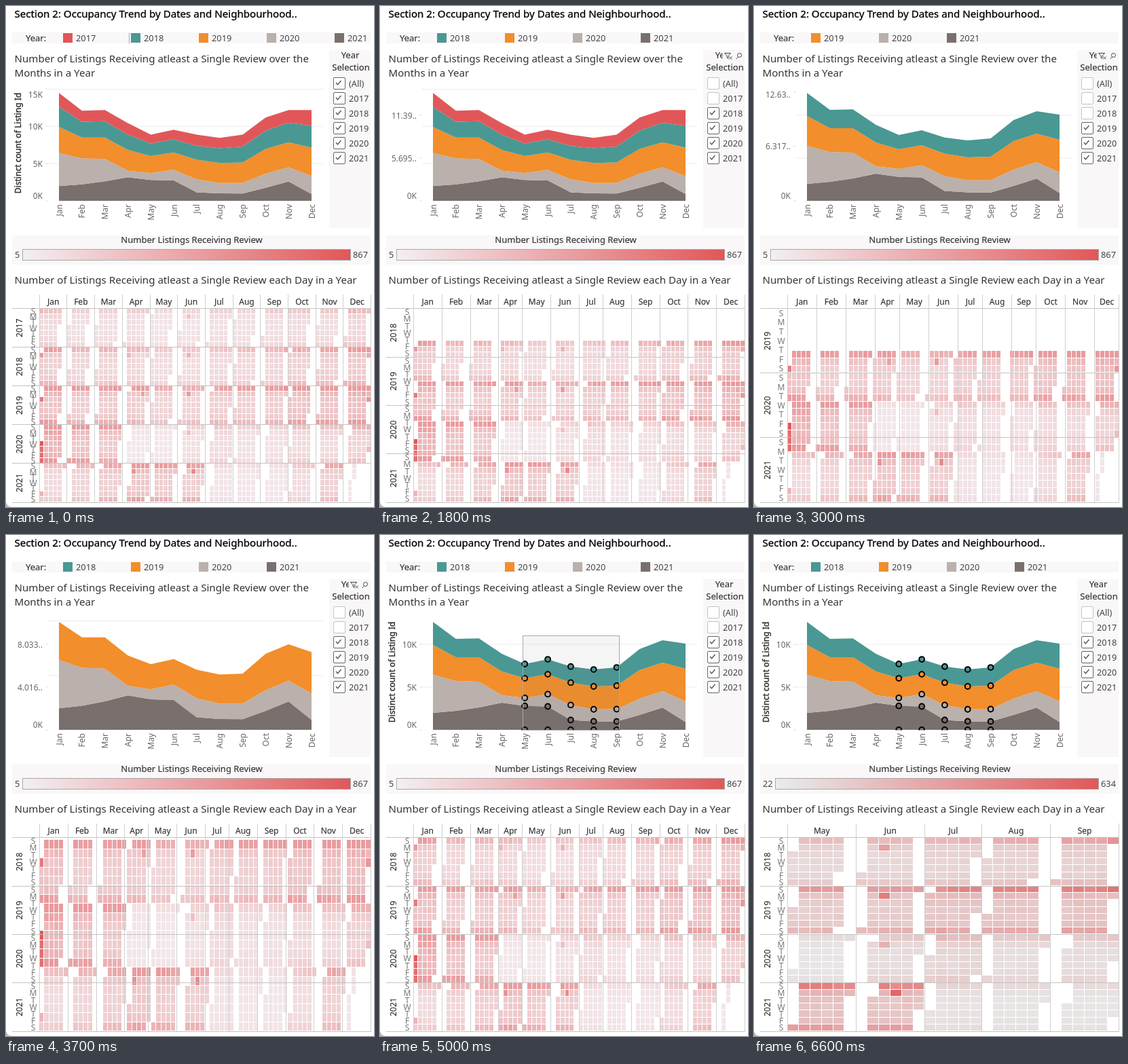
Write an HTML page with a canvas that moves like this. It is 542 px wide and 738 px high and loops after 7 s.

```html
<!DOCTYPE html>
<html lang="en">
<head>
<meta charset="utf-8">
<title>Occupancy Trend</title>
<style>
  html, body { margin: 0; width: 100%; height: 100%; overflow: hidden; background: #fff; }
  canvas, svg { position: absolute; left: 0; top: 0; }
  text { font-family: "Noto Sans", "Open Sans", sans-serif; font-size: 12px; fill: #333; }
  .head { font-size: 15.1px; }
  .title { font-size: 15.1px; fill: #000; stroke: #000; stroke-width: .3px; }
  .cap { font-size: 13px; stroke: #333; stroke-width: .15px; }
  .item { font-size: 12.8px; fill: #444; }
  .soft { fill: #666; }
  .axis { font-size: 12.1px; stroke: #333; stroke-width: .45px; }
  .month { stroke: #333; stroke-width: .15px; }
  .day { fill: #777; }
  .panel { fill: #f9f7f8; }
</style>
</head>
<body>
<canvas id="cells" width="542" height="738"></canvas>
<svg width="542" height="738" viewBox="0 0 542 738">
  <defs>
    <linearGradient id="ramp"><stop id="low"/><stop offset="1" stop-color="#e15759"/></linearGradient>
    <clipPath id="plot"><rect x="62" y="110" width="406" height="177.5"/></clipPath>
  </defs>
  <rect class="panel" x="9" y="39" width="528" height="16"/>
  <rect class="panel" x="476" y="65" width="61" height="262"/>
  <rect class="panel" x="9" y="338" width="528" height="43"/>
  <path d="M0 730Q1 737 8 738H0Z" fill="#bbb"/>
  <text class="title" x="12.5" y="16.5">Section 2: Occupancy Trend by Dates and Neighbourhood..</text>
  <text class="cap" x="29" y="52">Year:</text>
  <text class="head" x="12.5" y="83">Number of Listings Receiving atleast a Single Review over the</text>
  <text class="head" x="12.5" y="104">Months in a Year</text>
  <text class="cap" x="507" y="77" text-anchor="middle">Year</text>
  <text class="cap" x="508" y="95" text-anchor="middle">Selection</text>
  <text class="cap" x="273.5" y="349" text-anchor="middle">Number Listings Receiving Review</text>
  <text class="head" x="12.5" y="409">Number of Listings Receiving atleast a Single Review each Day in a Year</text>
  <g id="live"></g>
</svg>
<script>
const LOOP = 7000, STEP = 100;
const MONTHS = 'Jan Feb Mar Apr May Jun Jul Aug Sep Oct Nov Dec'.split(' ');
const COLORS = { 2017: '#e15759', 2018: '#499894', 2019: '#f28e2b', 2020: '#bab0ac', 2021: '#79706e' };
// Listings per month, in thousands
const COUNTS = {
  2017: [1.88, 1.47, 1.5, 1.56, 1.2, 1.3, 1.5, 1.39, 1.6, 1.76, 1.72, 2.12],
  2018: [2.7, 2.13, 2.2, 2.06, 1.67, 1.75, 1.88, 1.98, 2.14, 2.46, 2.62, 2.94],
  2019: [3.49, 2.79, 2.87, 2.78, 2.3, 2.33, 2.62, 2.68, 2.74, 3.33, 3.34, 3.81],
  2020: [4.45, 3.49, 3.01, .88, .93, 1.43, 1.75, 1.4, 1.44, 1.9, 1.92, 2.41],
  2021: [1.98, 2.22, 2.62, 3.17, 2.8, 2.74, 1.15, 1, .98, 1.75, 2.6, .92]
};
const WEEKDAY = [0, 1.15, .95, .9, .9, 1];
const EASTER = { 2018: 2, 2019: 22, 2021: 5 };
const LEFT = 49.3, RIGHT = 537.6, TOP = 445.7, BOTTOM = 731, BASE = 287, PLOT_H = 159;

const range = (a, b) => Array.from({ length: b - a + 1 }, (_, i) => a + i);
const lerp = (a, b, p) => a + (b - a) * p;
const clamp = (v, a, b) => Math.min(b, Math.max(a, v));
const ease = u => u * u * (3 - 2 * u);
const monthX = m => 78 + m * 33.82;

// How busy a day is, 0 to 1
function busyness(y, m, d, dow) {
  const n = COUNTS[y][m], base = .068 * n ** 1.2;
  const wave = Math.sin(y * 78.233 + (m * 31 + d) * 12.9898) * 43758.5453;
  const jitter = .9 + .2 * (wave - Math.floor(wave));
  if (m === 0 && d === 1) return Math.min(1, base * 2.5);
  if (m === 0 && d <= 4 && n > 4) return .85;
  if (m === 11 && d === 31) return base * 1.7;
  if (m === 5 && dow === 1 && d > 7 && d < 15) return base * 2.9;
  if (m === 3 && d === EASTER[y]) return base * 2.2;
  if (m === 8 && dow === 0 && d > 28) return base * 2.6;
  const factor = dow === 0 ? Math.min(2.3, 1.3 + .35 * n)
    : dow === 6 ? Math.min(1.7, .9 + .25 * n) : WEEKDAY[dow];
  return Math.min(.55, base * factor * jitter);
}

const days = [];
for (const y of range(2017, 2021)) {
  const first = new Date(y, 0, 1).getDay();
  let doy = 0;
  for (const m of range(0, 11)) {
    const count = new Date(y, m + 1, 0).getDate();
    for (let d = 1; d <= count; d++, doy++) {
      if (y === 2021 && m === 11 && d > 7) break;
      const dow = (first + doy) % 7;
      days.push({ y, m, dow, week: Math.floor((first + doy) / 7), value: 5 + 862 * busyness(y, m, d, dow) });
    }
  }
}

// Each month gets one slot per week that any shown year uses
function view(firstYear, months = range(0, 11), scale = { min: 5, max: 867, low: [243, 239, 242], x: 24 }) {
  const years = range(firstYear, 2021), cols = {};
  let slots = 0;
  for (const m of months) {
    const weeks = days.filter(c => c.m === m && years.includes(c.y)).map(c => c.week);
    const first = Math.min(...weeks), n = Math.max(...weeks) - first + 1;
    cols[m] = { first, n, start: slots };
    slots += n;
  }
  const top = Math.max(...range(0, 11).map(m => years.reduce((s, y) => s + COUNTS[y][m], 0)));
  return { years, months, cols, scale, top, slot: (RIGHT - LEFT) / slots, row: (BOTTOM - TOP) / years.length };
}
const colX = (v, m) => LEFT + v.cols[m].start * v.slot;
const shows = (v, c) => v.years.includes(c.y) && v.months.includes(c.m);
function place(v, c) {
  const h = v.row / 7;
  return [colX(v, c.m) + (c.week - v.cols[c.m].first) * v.slot,
    TOP + v.years.indexOf(c.y) * v.row + c.dow * h, v.slot, h];
}

// "axis" and "cells" are how far those parts have moved in the first step
const four = view(2018);
const phases = [
  { at: 0, view: view(2017), steps: 1 },
  { at: 1800, view: four, steps: 5, axis: .0663, cells: .165 },
  { at: 3000, view: view(2019), steps: 3, axis: .0319, cells: .12 },
  { at: 3700, view: four, steps: 6, axis: .08085, cells: .05 },
  { at: 5700, view: view(2018, range(4, 8), { min: 22, max: 634, low: [232, 237, 237], x: 31 }),
    steps: 5, axis: 0, cells: 0, lateFrom: 6 }
];

const ctx = document.getElementById('cells').getContext('2d');
const live = document.getElementById('live'), low = document.getElementById('low');

function drawCells(from, to, p, lateFrom = 12) {
  ctx.clearRect(0, 0, 542, 738);
  const { min, max, low } = to.scale, high = [225, 87, 89];
  for (const c of days) {
    if (!shows(to, c)) continue;
    let box = place(to, c);
    const moves = shows(from, c) && (c.m < lateFrom || from === to);
    if (moves) box = place(from, c).map((v, i) => lerp(v, box[i], p));
    ctx.globalAlpha = moves ? 1 : Math.max(0, 2 * p - 1);
    const f = clamp((c.value - min) / (max - min), 0, 1);
    ctx.fillStyle = `rgb(${low.map((v, i) => Math.round(lerp(v, high[i], f)))})`;
    const [x, y, w, h] = box, x0 = Math.round(x), y0 = Math.round(y);
    ctx.fillRect(x0, y0, Math.round(x + w) - x0 - 1, Math.round(y + h) - y0 - 1);
  }
}

const text = (x, y, s, cls, extra = '') => `<text x="${x}" y="${y}" class="${cls}" ${extra}>${s}</text>`;
const upright = (x, y, s, cls, anchor) =>
  text(0, 0, s, cls, `text-anchor="${anchor}" transform="translate(${x} ${y}) rotate(-90)"`);
const line = (x1, y1, x2, y2, color) => `<path d="M${x1} ${y1}L${x2} ${y2}" stroke="${color}" fill="none"/>`;
const mid = 'text-anchor="middle"', end = 'text-anchor="end"';

function yearLegend(years) {
  const dash = years.length === 5 ? '<path d="M181.5 40V55" stroke="#555" stroke-dasharray="1 1"/>' : '';
  return dash + years.map((y, i) => `<rect x="${84 + i * 100}" y="40" width="14" height="14" fill="${COLORS[y]}"/>` +
    text(103 + i * 100, 52, y, 'item')).join('');
}

function checkboxes(t) {
  return ['(All)', ...range(2017, 2021)].map((label, i) => {
    const y = 114 + i * 22;
    const off = i < 2 ? t >= 900 : i === 2 && t >= 3000 && t < 3700;
    return `<rect x="482.5" y="${y - 8.5}" width="17" height="17" rx="1.5" fill="#fff" stroke="${off ? '#c4c4c4' : '#666'}"/>` +
      (off ? '' : `<path d="M486 ${y - 1}l2.5 3 5-6" fill="none" stroke="#555" stroke-width="1.4"/>`) +
      text(505, y + 4.5, label, 'item');
  }).join('');
}

function hoverIcons(t) {
  if (t < 600 || t >= 4000) return '';
  return `<g opacity="${t < 700 ? .5 : 1}" fill="none" stroke="#444">
    <rect class="panel" x="505" y="66" width="30" height="15" stroke="none"/>
    <path d="M507.5 69.5h9l-3.5 4v4l-2-1.5v-2.5zM514.5 74.5l4 4m0-4l-4 4"/>
    <circle cx="529.5" cy="72.5" r="3"/><path d="M527.5 75l-3 3"/></g>`;
}

function areaChart(from, to, p, axisP) {
  const k = PLOT_H / lerp(from.top, to.top, p), ratio = lerp(from.top, to.top, axisP) / to.top;
  const settled = axisP === 1 || from.top === to.top;
  let out = '', grid = '', areas = '';
  for (const v of [5, 10, 15]) {
    const gy = BASE - v * k;
    if (gy > 118) grid += line(62, gy, 467, gy, '#ebebeb');
  }
  for (const v of [0, 5, 10, 15]) {
    const y = BASE - v * PLOT_H / to.top;
    if (y < 118) continue;
    const label = settled || !v ? v + 'K' : (v * ratio).toFixed(5).slice(0, 5) + '..';
    out += line(58, y, 62, y, '#e0e0e0') + text(54, clamp(y, 130, 279) + 4.5, label, 'soft', end);
  }
  const sums = MONTHS.map(() => 0), all = [...new Set([...from.years, ...to.years])].sort((a, b) => b - a);
  const edge = () => sums.map((s, m) => `${monthX(m)},${(BASE - s * k).toFixed(1)}`);
  for (const y of all) {
    const lower = edge();
    sums.forEach((s, m) => sums[m] = s + COUNTS[y][m]);
    const alpha = !to.years.includes(y) ? Math.min(1, 2 - 2 * p) : from.years.includes(y) ? 1 : Math.max(0, 2 * p - 1);
    areas += `<polygon points="${[...edge(), ...lower.reverse()].join(' ')}" fill="${COLORS[y]}" opacity="${alpha}"/>`;
  }
  if (settled) out += upright(22, 202, 'Distinct count of Listing Id', 'axis', 'middle');
  MONTHS.forEach((m, i) => out += upright(monthX(i) + 4.5, 292, m, 'soft', 'end'));
  return out + `<g clip-path="url(#plot)">${grid}${areas}</g>`;
}

function selection(t, v) {
  if (t < 4700) return '';
  const right = lerp(210, 353, clamp((t - 4600) / 400, 0, 1)), k = PLOT_H / v.top;
  let out = '';
  for (const m of range(4, 8)) {
    if (monthX(m) > right) break;
    let sum = 0;
    const dot = color => `<circle cx="${monthX(m)}" cy="${BASE - sum * k}" r="3.9" fill="${color}" stroke="#000" stroke-width="2"/>`;
    out += dot(COLORS[2021]);
    for (const y of [...v.years].reverse()) {
      sum += COUNTS[y][m];
      out += dot(COLORS[y]);
    }
  }
  const drag = t < 5700 ? `<rect x="210.5" y="148.5" width="${right - 211}" height="139" fill="#777" fill-opacity=".07" stroke="#aaa"/>` : '';
  return `<g clip-path="url(#plot)">${out}</g>${drag}`;
}

function colorLegend({ min, max, x }) {
  return `<rect x="${x + .5}" y="358.5" width="${507 - x}" height="16" fill="url(#ramp)" stroke="#aaa"/>` +
    text(13, 371, min, 'item') + text(511, 371, max, 'item');
}

function calendarFrame(v) {
  let out = line(9, 445.5, 537, 445.5, '#c4c4c4');
  for (const m of v.months) {
    const x = colX(v, m), w = v.cols[m].n * v.slot, edge = Math.floor(x) + .5;
    out += line(edge, 425, edge, 732, '#cfcfcf') + text(x + w / 2, 440, MONTHS[m], 'month', mid);
  }
  out += line(537.5, 425, 537.5, 732, '#cfcfcf');
  v.years.forEach((y, i) => {
    const top = TOP + i * v.row, bottom = Math.floor(top + v.row + .01) + .5;
    out += line(9, bottom, 537, bottom, '#c4c4c4') + upright(24, top + v.row / 2, y, 'month', 'middle');
    [...'SMTWTFS'].forEach((d, j) => out += text(40, top + (j + .5) * v.row / 7 + 4.4, d, 'day', mid));
  });
  return out;
}

function render(t) {
  const i = phases.findLastIndex(ph => ph.at <= t), ph = phases[i];
  const to = ph.view, from = i ? phases[i - 1].view : to;
  const u = ph.steps > 1 ? Math.min(1, (t - ph.at) / STEP / (ph.steps - 1)) : 1;
  const progress = start => u === 1 ? 1 : lerp(start, 1, ease(u));
  drawCells(from, to, progress(ph.cells), ph.lateFrom);
  low.setAttribute('stop-color', `rgb(${to.scale.low})`);
  live.innerHTML = yearLegend(to.years) + checkboxes(t) + hoverIcons(t) +
    areaChart(from, to, progress(0), progress(ph.axis)) + selection(t, to) +
    colorLegend(to.scale) + calendarFrame(to);
}

const began = performance.now();
let shown = -1;
function tick() {
  const now = performance.now() - began;
  const t = Math.floor(now % LOOP / STEP) * STEP;
  if (t !== shown) render(shown = t);
  requestAnimationFrame(tick);
}
tick();
</script>
</body>
</html>
```
